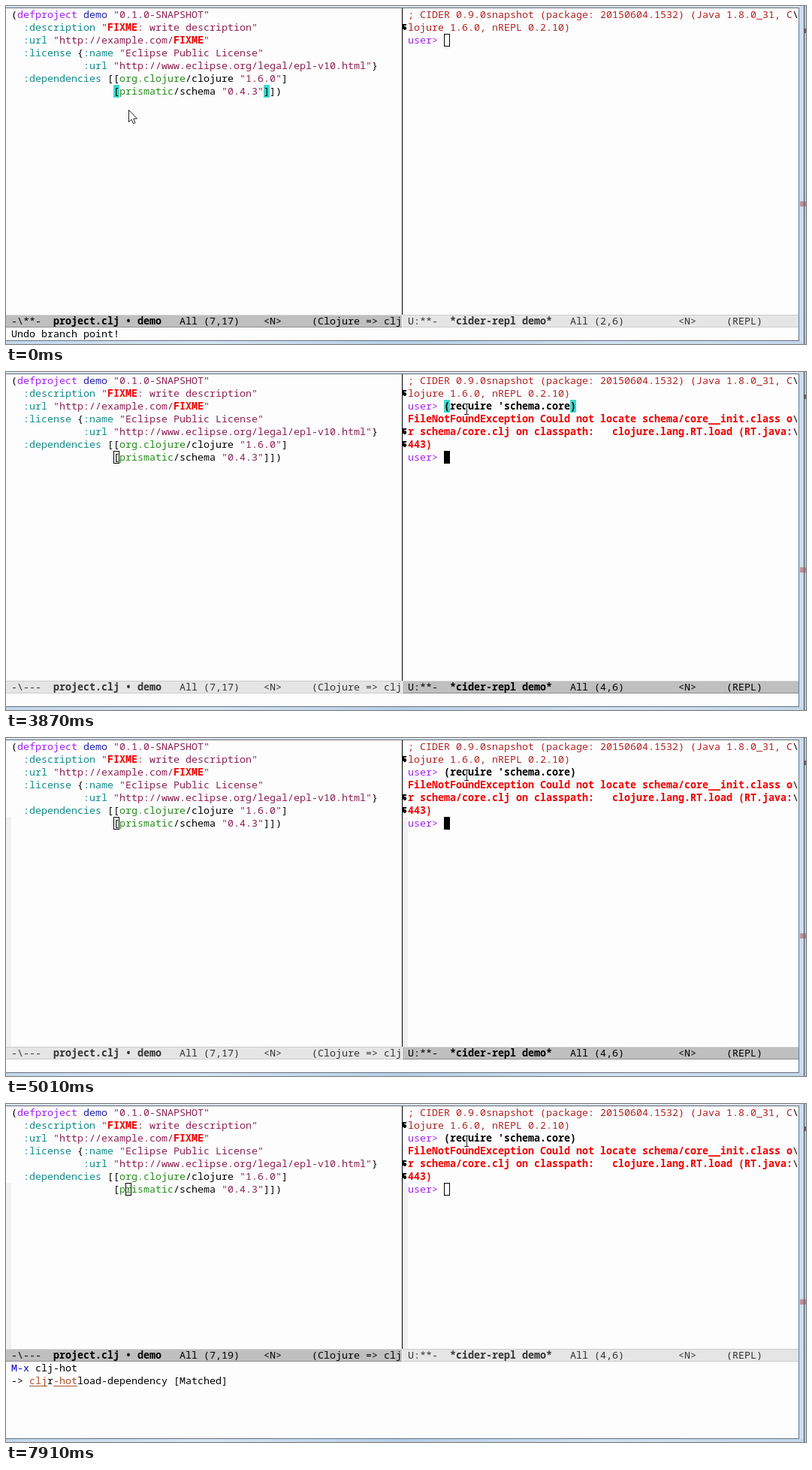
An HTML page with a canvas that plays this animation: 1065x450 px, repeating every 8 s.

```html
<!DOCTYPE html>
<html lang="en">
<head>
<meta charset="utf-8">
<title>Editor and REPL session</title>
<style>
  html, body { margin: 0; width: 100%; height: 100%; overflow: hidden; background: #fdfdfd; }
  canvas { display: block; width: 1065px; height: 450px; }
</style>
</head>
<body>
<canvas id="stage" width="1065" height="450"></canvas>
<script>
const ctx = document.getElementById('stage').getContext('2d');
const LOOP = 8000, CW = 8, LH = 17, TOP = 3, LEFT = 7, RIGHT = 535;
const BG = '#fdfdfd', PAREN = '#40d8cc';

// Upper-case style keys are bold.
const COLORS = {
  k: '#000', d: '#333', p: '#a020f0', n: '#2222a8', s: '#8b2252', t: '#138b8b',
  g: '#288b1c', r: '#b22222', e: '#f00000', b: '#3a5fcd', m: '#0000cd', o: '#a8522d', w: '#40e0d0'
};
const rowY = row => TOP + row * LH;

function rect(x, y, w, h, color) {
  ctx.fillStyle = color;
  ctx.fillRect(x, y, w, h);
}

// Draws style/text pairs on the character grid; '_' after a style underlines it.
function write(x, top, ...parts) {
  for (let i = 0; i < parts.length; i += 2) {
    const style = parts[i], key = style[0], lower = key.toLowerCase();
    ctx.font = `${key !== lower ? 'bold ' : ''}13.333px "Noto Sans Mono", "DejaVu Sans Mono", monospace`;
    ctx.fillStyle = COLORS[lower];
    const start = x;
    for (const ch of parts[i + 1]) {
      if (ch !== ' ') ctx.fillText(ch, x, top + 13);
      x += CW;
    }
    if (style[1] === '_') ctx.fillRect(start, top + 15, x - start, 1);
  }
}

function hollow(x, y) {
  ctx.strokeStyle = '#000';
  ctx.lineWidth = 1;
  ctx.strokeRect(x + 0.5, y + 0.5, CW - 1, LH - 1);
}

const cursors = {
  off() {},
  box: hollow,
  block: (x, y) => rect(x, y, CW, LH, '#000'),
  bar: (x, y) => rect(x, y + 15, CW, 2, '#000')
};

function drawProject(s) {
  const y = rowY(6), x = LEFT + s.col * CW;
  if (s.parens) for (const col of [17, 42]) rect(LEFT + col * CW, y, CW, LH, PAREN);
  const lines = [
    ['k', '(', 'p', 'defproject', 'n', ' demo', 's', ' "0.1.0-SNAPSHOT"'],
    ['t', '  :description ', 's', '"', 'E', 'FIXME', 's', ': write description"'],
    ['t', '  :url ', 's', '"http://example.com/', 'E', 'FIXME', 's', '"'],
    ['t', '  :license ', 'k', '{', 't', ':name ', 's', '"Eclipse Public License"'],
    ['t', '            :url ', 's', '"http://www.eclipse.org/legal/epl-v10.html"', 'k', '}'],
    ['t', '  :dependencies ', 'k', '[[', 'g', 'org.clojure', 'k', '/clojure ', 's', '"1.6.0"', 'k', ']'],
    ['k', ' '.repeat(17) + '[', 'g', 'prismatic', 'k', '/schema ', 's', '"0.4.3"', 'k', ']])']
  ];
  lines.forEach((line, i) => write(LEFT, rowY(i), ...line));
  cursors[s.left](x, y);
  if (s.left === 'block') write(x, y, s.parens ? 'w' : 'd', s.col === 17 ? '[' : '');
}

const stack = [
  ['RT.java', 443, 'lang.RT/load'], ['core.clj', 5641, 'core/load/fn'],
  ['core.clj', 5640, 'core/load'], ['RestFn.java', 408, 'lang.RestFn/invoke'],
  ['core.clj', 5446, 'core/load-one'], ['core.clj', 5486, 'core/load-lib/fn'],
  ['core.clj', 5485, 'core/load-lib'], ['RestFn.java', 142, 'lang.RestFn/applyT$'],
  ['core.clj', 626, 'core/apply'], ['core.clj', 5524, 'core/load-libs'],
  ['RestFn.java', 137, 'lang.RestFn/applyT$'], ['core.clj', 626, 'core/apply'],
  ['core.clj', 5607, 'core/require'], ['RestFn.java', 408, 'lang.RestFn/invoke'],
  ['REPL', 1, 'user/eval19748']
];

function drawError(s) {
  write(LEFT, rowY(1), 'k', '  Show: ', 'b_', 'Clojure', 'k', ' ', 'b_', 'Java', 'k', ' ', 'b_', 'REPL',
    'b', ' Tooling Duplicates All', 'k', '  (22 frames hid$');
  write(LEFT, rowY(3), 'k', '1. ', 's', 'Unhandled ', 'E', 'java.io.FileNotFoundException');
  write(LEFT, rowY(4), 's', '   Could not locate schema/core__init.class or schema/core.clj o', 'k', '$');
  write(LEFT, rowY(5), 's', '   classpath:');
  rect(LEFT, rowY(7), 520, stack.length * LH, '#0b3642');
  stack.forEach(([file, line, fn], i) => {
    const y = rowY(7 + i), name = file === 'REPL' ? fn : 'clojure.' + fn;
    if (name.endsWith('$')) rect(LEFT + 64 * CW, y, CW, LH, BG);
    write(LEFT, y, 'k', `${file}:`.padStart(31) + String(line).padStart(5) + '  ' + name);
  });
  cursors[s.left](LEFT, rowY(7));
}

// Continuation arrow in the fringe.
function wrapMark(row) {
  const y = rowY(row) + 4;
  rect(528, y, 5, 2, '#000');
  rect(528, y, 2, 4, '#000');
  rect(528, y + 4, 5, 3, '#000');
  rect(530, y + 3, 2, 5, '#000');
}

function drawRepl(s) {
  write(RIGHT, rowY(0), 'r', '; CIDER 0.9.0snapshot (package: 20150604.1532) (Java 1.8.0_31, C', 'k', '\\');
  write(RIGHT, rowY(1), 'r', 'lojure 1.6.0, nREPL 0.2.10)');
  wrapMark(1);
  if (s.replParens) for (const col of [6, 27]) rect(RIGHT + col * CW, rowY(2), CW, LH, PAREN);
  write(RIGHT, rowY(2), 'p', 'user> ', s.failed ? 'K' : 'k', s.input);
  let col = 6 + s.point, row = 2;
  if (s.failed) {
    write(RIGHT, rowY(3), 'E', 'FileNotFoundException Could not locate schema/core__init.class o', 'k', '\\');
    write(RIGHT, rowY(4), 'E', 'r schema/core.clj on classpath:   clojure.lang.RT.load (RT.java:', 'k', '\\');
    write(RIGHT, rowY(5), 'E', '443)');
    write(RIGHT, rowY(6), 'p', 'user>');
    wrapMark(4);
    wrapMark(5);
    col = 6;
    row = 6;
  }
  cursors[s.right](RIGHT + col * CW, rowY(row));
}

function modeLine(x, width, top, textX, active, flags, name, position, rest) {
  rect(x, top, width, LH, active ? '#bfbfbf' : '#e5e5e5');
  rect(x, top, width, 1, active ? '#d8d8d8' : '#cccccc');
  rect(x, top + LH - 1, width, 1, active ? '#8c8c8c' : '#cccccc');
  const ink = active ? 'k' : 'd';
  write(textX, top, ink, flags + '  ', ink.toUpperCase(), name, ink, '   All ' + position + rest);
}

function drawModeLines(s, top) {
  const leftActive = s.focus === 'left';
  if (s.error) {
    modeLine(0, 527, top, LEFT, leftActive, 'U:%*-', '*cider-error*', '(8,0)', '     <E>     (Stacktrace cider-tm');
  } else {
    modeLine(0, 527, top, LEFT, leftActive, s.saved ? '-\\---' : '-\\**-', 'project.clj • demo',
      `(7,${s.col})`, '    <N>     (Clojure => clj');
  }
  const pos = s.failed ? '(4,6)' : `(2,${6 + s.point})`;
  modeLine(528, 527, top, RIGHT, !leftActive, 'U:**-', '*cider-repl demo*', pos.padEnd(10),
    `    <${s.insert ? 'I' : 'N'}>     (REPL)`);
}

// Splits a candidate into matched and unmatched characters, in query order.
function matchParts(query, name) {
  let at = 0;
  return [...name].flatMap(ch => {
    const hit = at < query.length && ch === query[at];
    if (hit) at++;
    return [hit ? 'o_' : 'k', ch];
  });
}

function drawMini(s) {
  if (s.query === null) return write(LEFT, 428, 'k', s.message);
  write(LEFT, 343, 'm', 'M-x ', 'k', s.query);
  cursors[s.mini](LEFT + (4 + s.query.length) * CW, 343);
  s.choices.forEach((name, i) => {
    const parts = matchParts(s.query, name);
    if (s.choices.length === 1) parts.push('k', ' [Matched]');
    write(LEFT, 343 + (i + 1) * LH, 'k', i ? '   ' : '-> ', ...parts);
  });
}

function tracePath(points) {
  ctx.beginPath();
  points.forEach(([x, y]) => ctx.lineTo(x, y));
}

function drawMouse(s) {
  ctx.save();
  ctx.translate(...s.mouse);
  ctx.lineWidth = 1;
  if (s.beam) {
    for (const [color, width] of [['#fff', 3], ['#222', 1]]) {
      ctx.strokeStyle = color;
      ctx.lineWidth = width;
      ctx.beginPath();
      ctx.moveTo(-2, -6.5); ctx.lineTo(4, -6.5);
      ctx.moveTo(1.5, -6); ctx.lineTo(1.5, 7);
      ctx.moveTo(-2, 7.5); ctx.lineTo(4, 7.5);
      ctx.stroke();
    }
  } else {
    tracePath([[0.5, 0.5], [0.5, 16.5], [4, 13], [6.5, 18.5], [9, 17.5], [6.7, 12], [11.5, 12]]);
    ctx.closePath();
    ctx.fillStyle = '#fff';
    ctx.strokeStyle = '#222';
    ctx.fill();
    ctx.stroke();
  }
  ctx.restore();
}

function drawFrame() {
  rect(0, 0, 1065, 2, '#dbe5ef');
  rect(0, 2, 1056, 1, '#5f6b78');
  rect(1055, 2, 1, 444, '#6b7785');
  rect(1056, 0, 6, 450, '#cbdcee');
  rect(1062, 0, 1, 450, '#40505f');
  rect(1063, 0, 2, 450, '#b9c6d4');
  rect(0, 445, 1056, 1, '#66727f');
  const glass = ctx.createLinearGradient(0, 0, 1056, 0);
  ['#c3d7eb', '#d5e5f3', '#b5cee6', '#d0e1f1', '#c3d7eb'].forEach((c, i) => glass.addColorStop(i / 4, c));
  rect(0, 446, 1062, 4, glass);
  rect(1057, 260, 8, 7, 'rgba(170,70,75,.5)');
  rect(1063, 30, 2, 6, '#87535c');
}

const full = "(require 'schema.core)";
const typed = (input, point) => ({ input, point });

// Each entry changes part of the state from its time onward.
const timeline = [
  [0, { focus: 'left', left: 'off', right: 'box', mini: 'off', col: 17, parens: true, saved: false, error: false,
        failed: false, insert: false, replParens: false, fringe: false, beam: false, input: '', point: 0,
        query: null, choices: [], message: 'Undo branch point!', mouse: [163, 138] }],
  [290, { left: 'block' }],
  [820, { left: 'off' }],
  [970, { left: 'block', saved: true, message: 'Wrote c:/ws/demo/project.clj' }],
  [1500, { left: 'off' }],
  [1650, { mouse: [285, 116] }],
  [1800, { mouse: [470, 78] }],
  [1930, { mouse: [600, 52] }],
  [2080, { mouse: [611, 48], focus: 'right', left: 'box', right: 'block', message: '' }],
  [2350, { parens: false }],
  [2650, { insert: true, right: 'bar', message: '-- INSERT --' }],
  [2830, { ...typed('(req)', 4), message: '', beam: true, mouse: [612, 49] }],
  [3020, typed("(require 'sch)", 13)],
  [3200, { ...typed(full, full.length), replParens: true }],
  [3590, { right: 'off' }],
  [3870, { failed: true, insert: false, right: 'block' }],
  [4020, { error: true, focus: 'left', left: 'block', right: 'box' }],
  [4420, { left: 'off' }],
  [4860, { left: 'block' }],
  [5010, { error: false, focus: 'right', left: 'box', right: 'block', replParens: false, fringe: true }],
  [5570, { message: 'C-w-' }],
  [5720, { focus: 'left', left: 'block', right: 'box', parens: true, message: 'C-w C-h' }],
  [6000, { col: 18, message: '', parens: false }],
  [6140, { col: 19 }],
  [6570, { left: 'box', mini: 'block', query: '', choices: ['ag', 'cd', 'cf', 'gl', 'pl'] }],
  [6960, { query: 'c', choices: ['cd', 'cf', 'calc', 'cljr-add-declaration', 'compile'] }],
  [7130, { query: 'clj', choices: ['cljr-add-declaration', 'cljr-clean-ns', 'cljr-hotload-dependency',
                                   'cljr-move-form', 'cljr-rename-symbol'] }],
  [7310, { query: 'clj-h', choices: ['cljr-hotload-dependency', 'cljr-show-changelog', 'cljr-thread-first-all'] }],
  [7480, { query: 'clj-hot', choices: ['cljr-hotload-dependency'] }],
  [7910, { mini: 'off' }]
];

function stateAt(time) {
  return Object.assign({}, ...timeline.filter(([start]) => start <= time).map(([, change]) => change));
}

function render(time) {
  const s = stateAt(time), modeTop = s.query === null ? 411 : 326;
  rect(0, 0, 1065, 450, BG);
  if (s.fringe) for (const x of [0, 528]) rect(x, 105, 7, modeTop - 105, '#f1f1f1');
  (s.error ? drawError : drawProject)(s);
  rect(527, TOP, 1, modeTop - TOP, '#000');
  drawRepl(s);
  drawModeLines(s, modeTop);
  drawMini(s);
  drawFrame();
  drawMouse(s);
}

const begin = performance.now();
function tick() {
  render((performance.now() - begin) % LOOP);
  requestAnimationFrame(tick);
}
tick();
</script>
</body>
</html>
```
